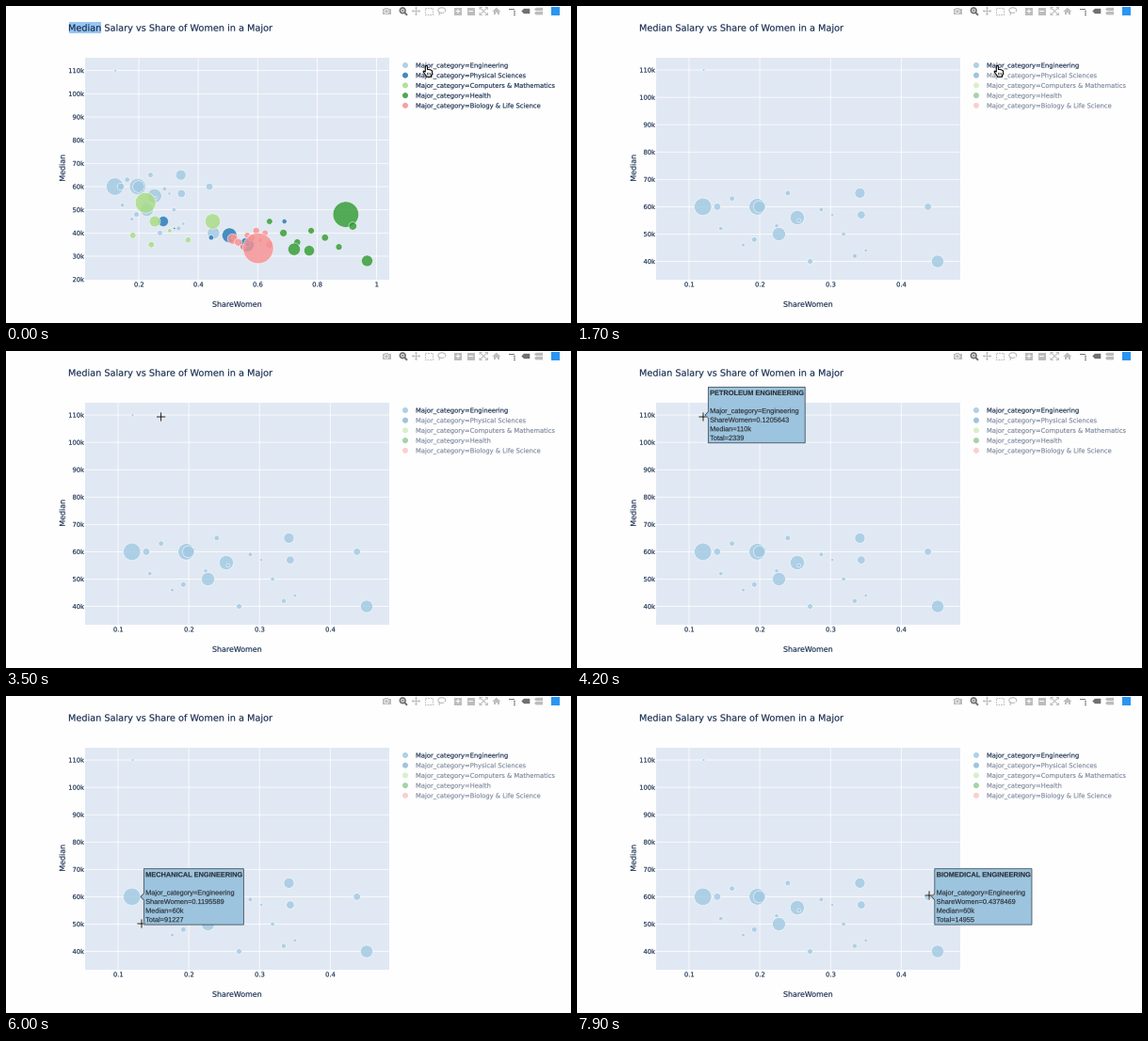
Recreate the animation shown at these times as a matplotlib script. Size 600x337 px, loop 8 s.

```python
import numpy as np
import matplotlib.pyplot as plt
from matplotlib.animation import FuncAnimation
from matplotlib.patches import Circle, PathPatch, Polygon, Rectangle
from matplotlib.textpath import TextPath
from matplotlib.transforms import Affine2D

W, H, DPI = 600, 337, 100
STEP, FRAMES = 100, 80
PX = 72 / DPI
INK = "#152a4e"
GREY, DARK = "#bcbcbc", "#707070"
LEFT, RIGHT, TOP, BOTTOM = 83.5, 406.5, 54.7, 290.6

fig = plt.figure(figsize=(W / DPI, H / DPI), dpi=DPI, facecolor="#fefefe")
ax = fig.add_axes([0, 0, 1, 1])
ax.set_xlim(0, W)
ax.set_ylim(H, 0)
ax.axis("off")
rng = np.random.default_rng(12)


def add(patch, z=1):
    patch.set_zorder(z)
    return ax.add_patch(patch)


def text(x, y, s, size=6.76, color=INK, align=0, angle=0, z=3, alpha=1,
         family="DejaVu Sans", weight="normal"):
    """Outline text; y is the baseline, align is 0 left, .5 centre, 1 right."""
    path = TextPath((0, 0), s, size=size, prop={"family": family, "weight": weight})
    shift = -align * path.get_extents().x1
    place = Affine2D().translate(shift, 0).rotate_deg(angle).scale(1, -1).translate(x, y)
    return add(PathPatch(place.transform_path(path), fc=color, ec=color,
                         lw=.15 * PX, alpha=alpha), z)


def rect(x0, y0, x1, y1, color, z=1, edge="none", lw=0.0, **kw):
    return add(Rectangle((x0, y0), x1 - x0, y1 - y0, fc=color, ec=edge, lw=lw * PX, **kw), z)


def poly(points, color, z=1, **kw):
    return add(Polygon(points, fc=color, **{"lw": 0, **kw}), z)


def line(xs, ys, color, lw=1.0, z=1):
    return ax.plot(xs, ys, color=color, lw=lw * PX, zorder=z, snap=False,
                   solid_capstyle="butt")[0]


def radius(total):
    return .968 * np.sqrt(total)


def wide(share, median):
    return 141 + (share - .2) * 315.6, 192 - (median - 60) * 2.467


def zoomed(share, median):
    return 119 + (share - .1) * 751, 213.4 - (median - 60) * 2.907


def majors(key, n, shares, medians, totals):
    """Key bubbles plus n small ones spread over the ranges, best paid first."""
    small = zip(rng.permutation(np.linspace(*shares, n)),
                np.linspace(*medians, n).round(), rng.uniform(*totals, n))
    return sorted(key + list(small), key=lambda p: -p[1])


# each bubble: share of women, median (thousands), graduates (thousands)
petroleum, mechanical, biomedical = (.1206, 110, 2.3), (.1196, 60, 91), (.4378, 60, 15)
engineering = majors(
    [petroleum, mechanical, biomedical, (.3416, 65, 32), (.1965, 60, 82),
     (.1994, 60, 42), (.1398, 60, 15), (.3435, 57, 19), (.253, 56, 61),
     (.2271, 50, 53), (.4515, 40, 46)],
    14, (.145, .35), (65, 40), (2, 9))
physics = majors([(.2824, 45, 32), (.5051, 39, 66), (.564, 35, 62)],
                 4, (.32, .69), (45, 35), (1, 8))
computing = majors([(.2227, 53, 128), (.254, 45, 37), (.4487, 45, 72)],
                   4, (.18, .366), (41, 35), (3, 14))
health = majors([(.8965, 48, 200), (.7228, 33, 46), (.7735, 32.4, 33), (.9684, 28, 38)],
                7, (.64, .92), (45, 34), (11, 20))
biology = majors([(.6019, 33.4, 281), (.516, 37.4, 33)],
                 9, (.52, .64), (41, 34), (3, 18))
groups = [("Engineering", "#a1c9e2", engineering),
          ("Physical Sciences", "#1f75b6", physics),
          ("Computers & Mathematics", "#a8dc82", computing),
          ("Health", "#2f9a2f", health),
          ("Biology & Life Science", "#f99090", biology)]


def chart(scale, xticks, yticks, shown):
    parts = []
    for v in xticks:
        x = scale(v, 0)[0]
        parts += [line([x, x], [TOP, BOTTOM], "white", .8),
                  text(x, 298.4, f"{v:g}", align=.5)]
    for v in yticks:
        y = scale(0, v)[1]
        if y < BOTTOM - 1:
            parts.append(line([LEFT, RIGHT], [y, y], "white", .8))
        parts.append(text(83, y + 2.5, f"{v}k", align=1))
    for _, color, points in shown:
        for share, median, total in points:
            parts.append(add(Circle(scale(share, median), radius(total), fc=color,
                                    ec="white", lw=.6 * PX, alpha=.8), 2))
    return parts


def legend(dimmed):
    parts = []
    for i, (name, color, _) in enumerate(groups):
        y = 63 + 10.7 * i
        a = .5 if dimmed and i else 1
        parts += [add(Circle((424, y), 3, fc=color, lw=0, alpha=.85 * a), 2),
                  text(435, y + 2.5, "Major_category=" + name, alpha=a)]
    return parts


def modebar():
    signs = [(sx, sy) for sx in (-1, 1) for sy in (-1, 1)]
    # camera
    rect(399.5, 2.8, 408.5, 9, GREY)
    rect(402, 1.6, 406, 3, GREY)
    add(Circle((404, 5.8), 2.1, fc=GREY, ec="white", lw=.8 * PX))
    # zoom
    add(Circle((421.2, 4.8), 2.8, fc="none", ec=DARK, lw=1.7 * PX))
    line([423.3, 426], [7, 9.8], DARK, 2)
    line([419.8, 422.6], [4.8, 4.8], DARK, .8)
    line([421.2, 421.2], [3.4, 6.2], DARK, .8)
    # pan
    line([431.5, 439.5], [5.4, 5.4], GREY)
    line([435.5, 435.5], [1.4, 9.4], GREY)
    for d in np.array([(1, 0), (-1, 0), (0, 1), (0, -1)]):
        tip = (435.5, 5.4) + 4.8 * d
        side = 1.6 * d[::-1]
        poly([tip, tip - 2 * d + side, tip - 2 * d - side], GREY)
    # box and lasso select
    rect(445, 1.8, 453, 9.2, "none", edge=GREY, lw=1.1, ls=(0, (1.5, 1)))
    t = np.linspace(.9, 6.9, 30)
    line(462.8 + 4 * np.cos(t), 4.6 + 2.8 * np.sin(t), GREY, 1.1)
    line([459.5, 460.6, 459.8], [6.3, 8, 9.8], GREY, 1.1)
    # zoom in and out
    for x in (480, 493.6):
        rect(x - 4, 1.6, x + 4, 9.5, GREY)
        line([x - 2.4, x + 2.4], [5.5, 5.5], "white")
    line([480, 480], [3.1, 7.9], "white")
    # autoscale
    for sx, sy in signs:
        x, y = 507.2 + 4.2 * sx, 5.5 + 4 * sy
        line([507.2, x], [5.5, y], GREY)
        line([x - 2.6 * sx, x, x], [y, y, y - 2.4 * sy], GREY)
    # home
    poly([(516.2, 5.9), (520.8, 1.6), (525.4, 5.9)], GREY)
    rect(517.5, 5.6, 524.1, 9.4, GREY)
    rect(520, 7, 521.6, 9.4, "white")
    # spike lines
    for k in range(3):
        rect(534.2 + 2.1 * k, 2.6, 535.6 + 2.1 * k, 4, DARK)
        rect(539.4, 4.6 + 2.1 * k, 540.8, 6 + 2.1 * k, DARK)
    # hover modes
    for x, y, h, color in ((547.3, 2.8, 5.4, DARK), (561, 1.8, 3.4, GREY), (561, 6, 3.4, GREY)):
        poly([(x, y + h / 2), (x + h / 2, y), (x + 9, y), (x + 9, y + h), (x + h / 2, y + h)],
             color)
    rect(579, 1, 588.2, 10, "#2b95f0")


def tooltip(name, major, share, total):
    px, py = zoomed(*major[:2])
    edge = px + radius(major[2])
    x, y = edge + 3.4, py - 29.7
    font = dict(size=7.37, color="#2b2f36", family="Liberation Sans", z=6)
    rows = ["Major_category=Engineering", f"ShareWomen={share}",
            f"Median={major[1]}k", f"Total={total}"]
    head = text(x + 1.8, y + 8.6, name + " ENGINEERING", weight="bold", **font)
    body = [text(x + 1.8, y + 8.6 + 9.58 * k, s, **font) for k, s in enumerate(rows, 2)]
    x1, y1 = head.get_path().get_extents().x1 + 1.6, y + 59.4
    outline = [(edge, py), (x, py - 3.4), (x, y), (x1, y), (x1, y1), (x, y1), (x, py + 3.4)]
    box = poly(outline, "#9cc4de", 5, ec="#3c4650", lw=.8 * PX)
    return [box, head] + body


def show(parts, on):
    for p in parts:
        p.set_visible(bool(on))


rect(LEFT, TOP, RIGHT, BOTTOM, "#e0e8f3", z=0)
modebar()
highlight = [rect(66.6, 17, 100.8, 28.6, "#97c6f2")]
text(66, 26.6, "Median Salary vs Share of Women in a Major", size=9.71)
text(245, 319.8, "ShareWomen", size=7.93, align=.5)
text(62.6, 172.6, "Median", size=7.93, align=.5, angle=90)

before = chart(wide, (.2, .4, .6, .8, 1), range(20, 111, 10), groups) + legend(False)
after = chart(zoomed, (.1, .2, .3, .4), range(40, 111, 10), groups[:1]) + legend(True)

# tooltips with the times they are visible
tips = [(tooltip("PETROLEUM", petroleum, "0.1205643", 2339), 3700, 4900),
        (tooltip("MECHANICAL", mechanical, "0.1195589", 91227), 5000, 6200),
        (tooltip("BIOMEDICAL", biomedical, "0.4378469", 14955), 7200, 8000)]

HAND = [(-1, .3), (0, -.5), (1, .3), (1.2, 3.6), (4.4, 4), (6.3, 5.2), (6.3, 8.2),
        (5.2, 10), (5.1, 11.4), (0, 11.4), (-.2, 10.2), (-3.3, 6.2), (-2.5, 5.2), (-1, 6.3)]
hand = [poly(HAND, "white", 8, ec="black", lw=1.05 * PX, joinstyle="round")]
hand += [line([x, x], [7, 9.6], "black", .6, 9) for x in (1, 2.6, 4.2)]
cross = [line(xs, ys, color, lw, 8)
         for color, lw in (("white", 2.2), ("#111111", 1))
         for xs, ys in (([-4.6, 4.6], [0, 0]), ([0, 0], [-4.6, 4.6]))]

# cursor moves: start, end, where it arrives
START = (446.3, 63.8)
MOVES = [(2200, 2600, (428.3, 70)), (2700, 3700, (134, 70)), (4600, 6000, (144, 242)),
         (6200, 6900, (382, 228)), (6900, 7200, (374, 212))]


def cursor_at(t):
    pos = np.array(START)
    for start, end, goal in MOVES:
        u = np.clip((t - start) / (end - start), 0, 1)
        pos = pos + (np.array(goal) - pos) * u * u * (3 - 2 * u)
    return pos


def draw(frame):
    t = frame * STEP
    show(highlight, t < 700)
    show(before, t < 1200)
    show(after, t >= 1200)
    for parts, start, end in tips:
        show(parts, start <= t < end)
    x, y = cursor_at(t)
    place = Affine2D().translate(x, y) + ax.transData
    for p in hand + cross:
        p.set_transform(place)
    show(hand, x > RIGHT)
    show(cross, x <= RIGHT)
    return []


anim = FuncAnimation(fig, draw, frames=FRAMES, interval=STEP, repeat=True,
                     repeat_delay=0, blit=False)
plt.show()
```
